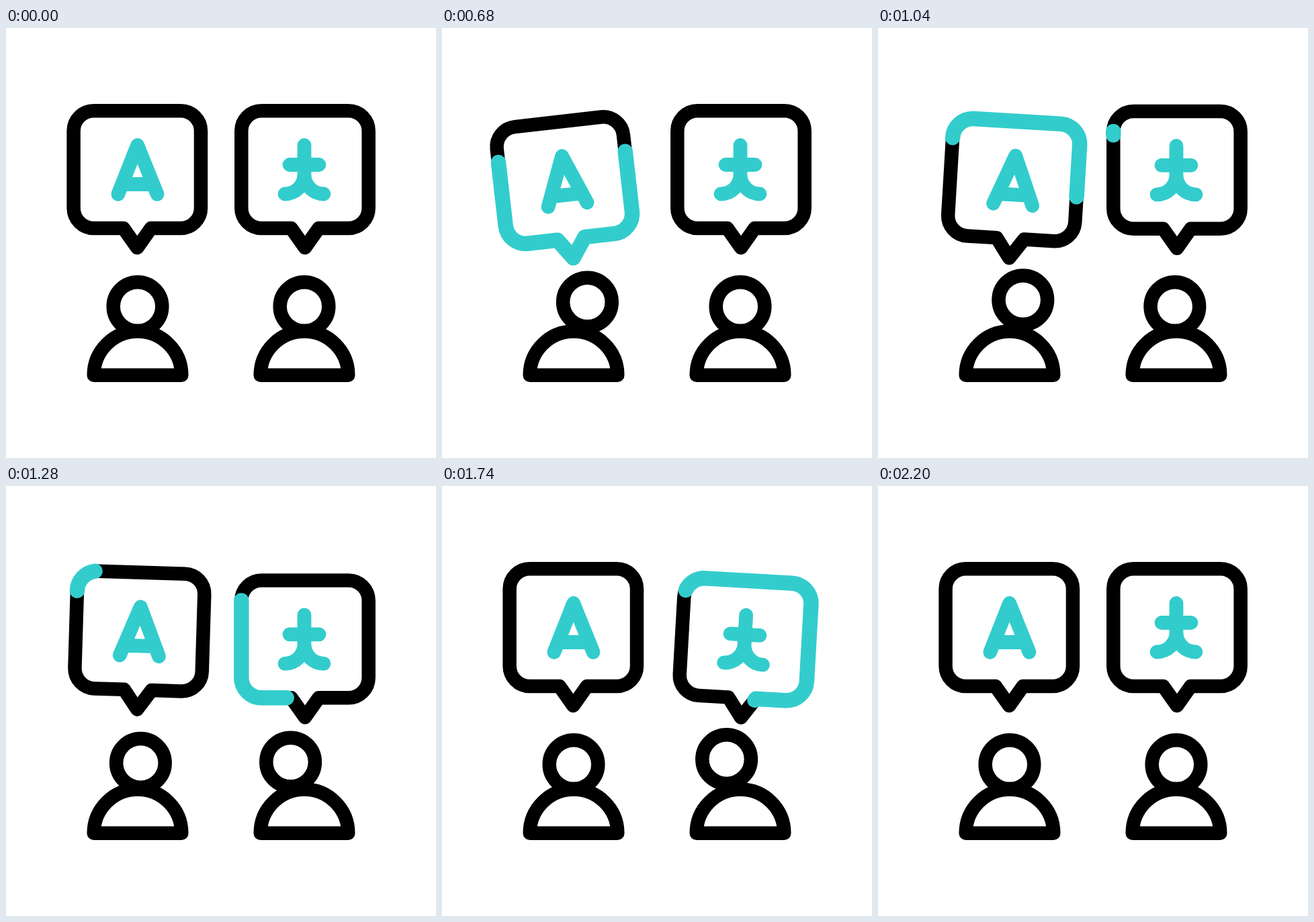
Animation, 640 px wide and 640 px high, one loop 2400 ms. Source, as an HTML page with a canvas:

```html
<!DOCTYPE html>
<html lang="en">
<head>
<meta charset="utf-8">
<title>Two speakers</title>
<style>
  html, body { margin: 0; width: 100%; height: 100%; overflow: hidden; background: #fff; }
  canvas { display: block; width: 640px; height: 640px; }
</style>
</head>
<body>
<canvas id="stage"></canvas>
<script>
const LOOP = 2400, STEP = 20;
const BLACK = '#000', TEAL = '#33cccc';
const canvas = document.getElementById('stage');
const ctx = canvas.getContext('2d');
const ratio = window.devicePixelRatio || 1;
canvas.width = canvas.height = 640 * ratio;

// All shapes are laid out around x = 0.
const LEFT = -94.7, RIGHT = 94.7, TOP = 123.2, BOTTOM = 298, R = 30;
const TAIL = 20.5, TIP = 327;
const bubble = new Path2D();
bubble.moveTo(LEFT, TOP + R);
bubble.arcTo(LEFT, BOTTOM, LEFT + R, BOTTOM, R);
bubble.lineTo(-TAIL, BOTTOM);
bubble.lineTo(0, TIP);
bubble.lineTo(TAIL, BOTTOM);
bubble.arcTo(RIGHT, BOTTOM, RIGHT, BOTTOM - R, R);
bubble.arcTo(RIGHT, TOP, RIGHT - R, TOP, R);
bubble.arcTo(LEFT, TOP, LEFT, TOP + R, R);
bubble.closePath();
const bubbleLength = 2 * (BOTTOM - TOP - 2 * R) + 2 * (RIGHT - LEFT - 2 * R)
  - 2 * TAIL + 2 * Math.hypot(TAIL, TIP - BOTTOM) + 2 * Math.PI * R;

const letter = new Path2D('M-28.5 247.3L.3 174.5L29.8 247.3M-22 232.5H23');
const sign = new Path2D(
  'M-1 174.5V218A29 29 0 0 1-30 247M-1 218A29 29 0 0 0 28 247M-23 203.5H21');
const body = new Path2D('M-65.3 516.8A65.3 65.3 0 0 1 65.3 516.8Z');
const head = new Path2D();
head.arc(0, 414.5, 36.3, 0, 2 * Math.PI);

const speakers = [
  { x: 195.3, bodyX: 196, start: 0, side: 1, drop: 15.3, glyph: letter },
  { x: 445, bodyX: 444, start: 800, side: -1, drop: 17.5, glyph: sign }
];

// Eased value between [time, value] keys.
function track(t, keys) {
  if (t <= keys[0][0]) return keys[0][1];
  for (let i = 1; i < keys.length; i++) {
    const [t0, v0] = keys[i - 1], [t1, v1] = keys[i];
    if (t < t1) {
      const p = (t - t0) / (t1 - t0);
      return v0 + (v1 - v0) * p * p * (3 - 2 * p);
    }
  }
  return keys[keys.length - 1][1];
}

function stroke(path, color, width) {
  ctx.strokeStyle = color;
  ctx.lineWidth = width;
  ctx.stroke(path);
}

function drawPerson(s, t) {
  const dx = s.side * track(t, [[200, 0], [400, 20.4], [1000, 20.4], [1400, 0]]);
  const dy = track(t, [[400, 0], [600, -10], [800, 0], [1000, -10], [1400, 0]]);
  ctx.save();
  ctx.translate(s.bodyX, 0);
  stroke(body, BLACK, 20.5);
  ctx.translate(dx, dy);
  stroke(head, BLACK, 20.5);
  ctx.restore();
}

function drawBubble(s, t) {
  const drop = track(t, [[200, 0], [500, s.drop], [1100, s.drop], [1400, 0]]);
  const tilt = s.side * track(t, [[500, 0], [800, -10], [1100, 5], [1400, 0]]);
  const from = track(t, [[600, 0], [1400, 1]]) * bubbleLength;
  const to = track(t, [[200, 0], [1000, 1]]) * bubbleLength;
  ctx.save();
  ctx.translate(s.x, drop + TIP - 1);
  ctx.rotate(tilt * Math.PI / 180);
  ctx.translate(0, 1 - TIP);
  stroke(bubble, BLACK, 20.5);
  if (to - from > 0.01) {
    ctx.setLineDash([to - from, 2000]);
    ctx.lineDashOffset = -from;
    stroke(bubble, TEAL, 22.5);
    ctx.setLineDash([]);
  }
  stroke(s.glyph, TEAL, 20.8);
  ctx.restore();
}

function draw(time) {
  ctx.setTransform(ratio, 0, 0, ratio, 0, 0);
  ctx.fillStyle = '#fff';
  ctx.fillRect(0, 0, 640, 640);
  ctx.lineCap = ctx.lineJoin = 'round';
  for (const s of speakers) {
    drawPerson(s, time - s.start);
    drawBubble(s, time - s.start);
  }
}

const begin = performance.now();
function frame() {
  const t = (performance.now() - begin) % LOOP;
  draw(Math.floor(t / STEP) * STEP);
  requestAnimationFrame(frame);
}
frame();
</script>
</body>
</html>
```
